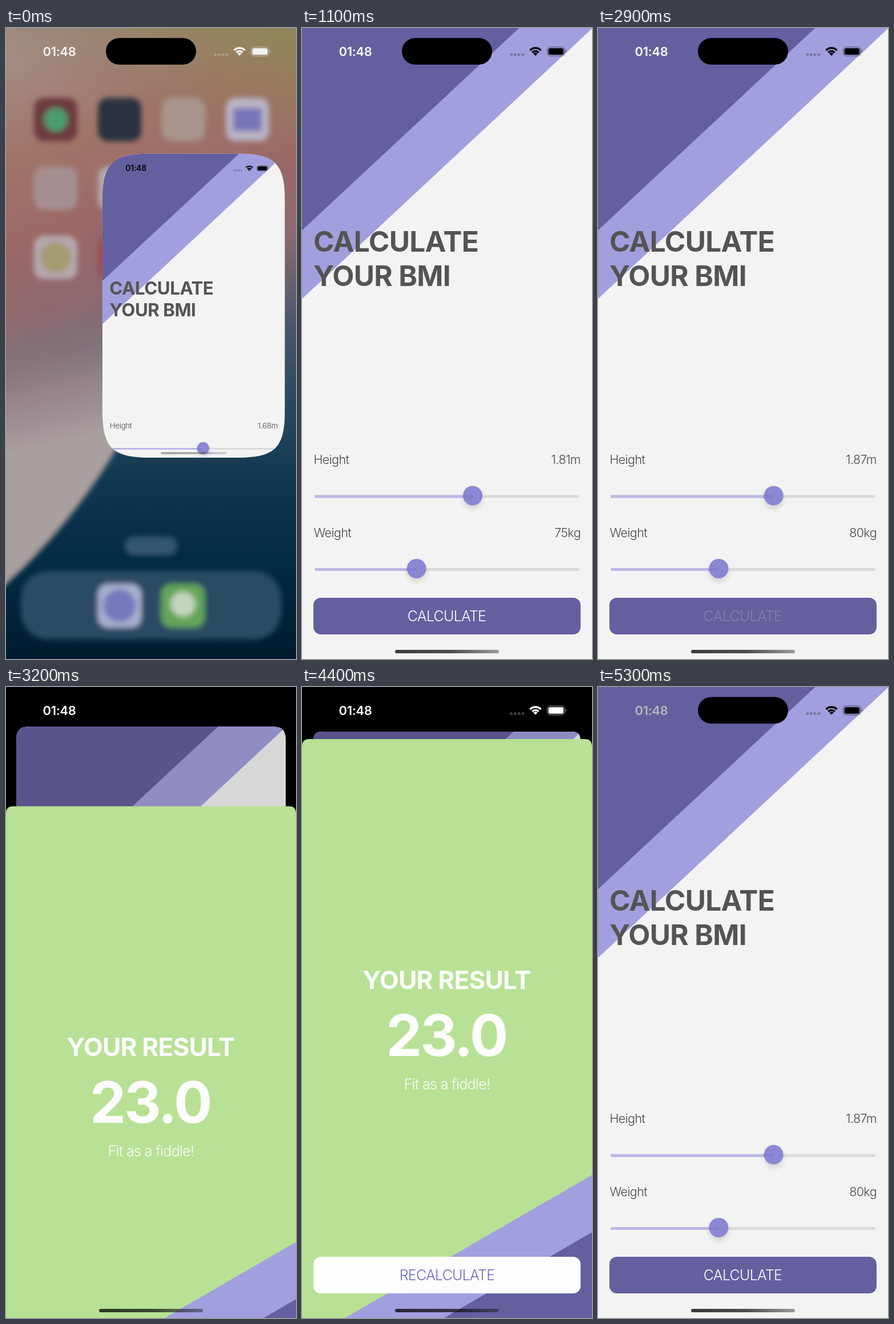
An HTML page for the animation above (5.4 s loop, 508 px wide and 1103 px high).

```html
<!DOCTYPE html>
<html lang="en">
<head>
<meta charset="utf-8">
<title>BMI calculator</title>
<style>
  html, body { margin: 0; width: 100%; height: 100%; overflow: hidden; background: #000; }
  svg { display: block; width: 100vw; height: 100vh; }
  text { font-family: Inter, "Liberation Sans", sans-serif; }
  .title { font-weight: 700; font-size: 49.5px; letter-spacing: -.014em; fill: #545454; }
  .label { font-weight: 300; font-size: 21.5px; letter-spacing: -.028em; fill: #484848; }
  .btn { font-weight: 300; font-size: 25px; letter-spacing: -.03em; text-anchor: middle; }
  .head { font-weight: 700; font-size: 44px; letter-spacing: -.017em; text-anchor: middle; }
  .score { font-weight: 700; font-size: 100.5px; letter-spacing: -.033em; text-anchor: middle; }
  .note { font-weight: 300; font-size: 25px; letter-spacing: -.026em; text-anchor: middle; }
  .clock { font-weight: 600; font-size: 22px; letter-spacing: -.015em; }
  .end { text-anchor: end; }
</style>
</head>
<body>
<svg id="stage" viewBox="0 0 508 1103" preserveAspectRatio="none"></svg>
<script>
const W = 508, H = 1103, LOOP = 5400, STEP = 100;
const DARK = '#645f9e', LIGHT = '#a29fde';
const $ = id => document.getElementById(id);
const set = (id, attrs) => {
  for (const k in attrs) $(id).setAttribute(k, attrs[k]);
};
const clamp = v => Math.min(1, Math.max(0, v));

const rect = (x, y, w, h, r, fill, more = '') =>
  `<rect x="${x}" y="${y}" width="${w}" height="${h}" rx="${r}" fill="${fill}" ${more}/>`;
const text = (x, y, cls, str, more = '') =>
  `<text x="${x}" y="${y}" class="${cls}" ${more}>${str}</text>`;
const dot = (x, y, r, fill, more = '') =>
  `<circle cx="${x}" cy="${y}" r="${r}" fill="${fill}" ${more}/>`;
const tile = (x, y, fill) => rect(x - 38, y - 38, 76, 76, 18, fill);
const stops = list => list.map(([o, c, a = 1]) =>
  `<stop offset="${o}" stop-color="${c}" stop-opacity="${a}"/>`).join('');
const ramp = (id, x1, y1, x2, y2, list) =>
  `<linearGradient id="${id}" gradientUnits="userSpaceOnUse" x1="${x1}" y1="${y1}" x2="${x2}" y2="${y2}">${stops(list)}</linearGradient>`;

// Rounded rectangle with continuous-curvature corners
function squircle(w, h, r) {
  const e = 1.5 * r, c = .281 * r;
  return `M${e} 0H${w - e}C${w - c} 0 ${w} ${c} ${w} ${e}V${h - e}` +
    `C${w} ${h - c} ${w - c} ${h} ${w - e} ${h}H${e}` +
    `C${c} ${h} 0 ${h - c} 0 ${h - e}V${e}C0 ${c} ${c} 0 ${e} 0Z`;
}

function arc(r) {
  const d = r * Math.SQRT1_2;
  return `M${409 - d} ${48.4 - d}A${r} ${r} 0 0 1 ${409 + d} ${48.4 - d}`;
}

function statusBar(id) {
  const cells = [366.6, 373.4, 380.2, 387].map(x => dot(x, 46.4, 2.5, 'currentColor', 'opacity=".25"')).join('');
  return `<g id="${id}">
    <g id="${id}Time">${text(64.5, 49, 'clock', '01:48', 'fill="currentColor"')}</g>
    <g id="${id}Icons">${cells}
      <path d="${arc(13.4)}${arc(8)}" fill="none" stroke="currentColor" stroke-width="3.4"/>
      <path d="M409 48.4L405.2 44.6A5.4 5.4 0 0 1 412.8 44.6Z" fill="currentColor"/>
      ${rect(429.6, 33.2, 30.6, 15.6, 5, 'none', 'stroke="currentColor" stroke-width="1.3" stroke-opacity=".45"')}
      ${rect(431.6, 35.2, 26.6, 11.6, 3.2, 'currentColor')}
      <path d="M461.8 38.4Q465 41 461.8 43.6Z" fill="currentColor" opacity=".5"/>
    </g></g>`;
}

function slider(id, y, label) {
  return text(20.5, y - 57, 'label', label) +
    text(488, y - 57, 'label end', '', `id="${id}Text"`) +
    rect(22, y - 2.5, 464, 5, 2.5, '#dadadb') +
    rect(22, y - 2.5, 200, 5, 2.5, '#bcb9e5', `id="${id}Fill"`) +
    `<g id="${id}Knob">${dot(0, y + 4, 17, '#000', 'opacity=".13" filter="url(#soft)"')}
     ${dot(0, y - 1.5, 17, '#8b87d2')}${rect(-17, y - 2.5, 17, 5, 0, '#827ecf')}</g>`;
}

const home = `<g id="home">
  ${rect(0, 0, W, H, 0, 'url(#night)')}
  ${rect(0, 0, W, H, 0, 'url(#dusk)')}
  ${rect(0, 0, W, 330, 0, 'url(#olive)')}
  <path d="M-30 480H260L240 640C205 735 105 885 -20 990Z" fill="url(#dune)" filter="url(#blur)"/>
  <g filter="url(#blur)">
    ${tile(87, 160, '#6d3b40')}${dot(87, 160, 21, '#4b9a70')}
    ${tile(199, 160, '#2b3340')}
    ${tile(311, 160, '#a8948c')}
    ${tile(423, 160, '#b9b3c4')}${rect(398, 140, 50, 40, 4, '#7774b8')}
    ${tile(87, 280, '#a68f90')}${tile(199, 280, '#b5a9a9')}
    ${tile(87, 401, '#b5a9ad')}${dot(87, 401, 27, '#a39b72')}
    ${tile(199, 401, '#a04a50')}
    ${rect(208, 889, 92, 33, 16, '#35566c')}
    ${rect(26, 949, 456, 120, 48, '#2b4b62')}
    ${tile(199, 1010, '#a9b1cf')}${dot(199, 1010, 29, '#7779bd')}
    ${tile(310, 1010, '#63a559')}${dot(310, 1007, 22, '#c3d4bd')}
  </g>
  ${rect(0, 0, W, H, 0, '#000', 'id="shade"')}
</g>`;

const card = `<g id="card"><g clip-path="url(#cardClip)">
  ${rect(0, 0, W, H, 0, '#f3f3f3')}
  <path d="M0 0H509L0 473.5Z" fill="${LIGHT}"/>
  <path d="M0 0H380.5L0 353.5Z" fill="${DARK}"/>
  ${text(20, 391, 'title', 'CALCULATE')}${text(20, 451, 'title', 'YOUR BMI')}
  ${slider('height', 819, 'Height')}${slider('weight', 946.5, 'Weight')}
  ${rect(20, 996, 468, 64, 13, DARK)}
  ${text(253.5, 1037, 'btn', 'CALCULATE', 'id="go" fill="#fff"')}
  ${statusBar('inner')}
  ${rect(0, 0, W, H, 0, '#000', 'id="dim"')}
</g></g>`;

const sheet = `<g id="sheet"><g clip-path="url(#sheetClip)">
  ${rect(0, 91, W, 1012, 0, '#b8e195')}
  <path d="M508 853V1103H75Z" fill="${LIGHT}"/>
  <path d="M508 953V1103H249Z" fill="${DARK}"/>
  ${text(253.5, 528, 'head', 'YOUR RESULT', 'fill="#fdfdfd"')}
  ${text(252.5, 645, 'score', '23.0', 'fill="#fdfdfd"')}
  ${text(254, 703, 'note', 'Fit as a fiddle!', 'fill="#fdfdfd"')}
  ${rect(20, 996, 468, 64, 13, '#fdfdfe')}
  ${text(254, 1037, 'btn', 'RECALCULATE', 'fill="#6e69c4"')}
</g></g>`;

$('stage').innerHTML = `<defs>
  <filter id="blur" x="-20%" y="-20%" width="140%" height="140%"><feGaussianBlur stdDeviation="5"/></filter>
  <filter id="soft" x="-60%" y="-60%" width="220%" height="220%"><feGaussianBlur stdDeviation="5"/></filter>
  ${ramp('night', 0, 300, 0, H, [[0, '#5a7079'], [.3, '#3b5a70'], [.6, '#123850'], [.8, '#022a42'], [1, '#021b2e']])}
  ${ramp('dusk', 110, 0, 350, 720, [[0, '#a38f88'], [.25, '#a07468'], [.45, '#9b6768'], [.62, '#8a6a70'], [.78, '#59596b', .8], [1, '#1c3c55', 0]])}
  ${ramp('olive', 420, 0, 340, 200, [[0, '#8f8656', .85], [.35, '#93805c', .6], [1, '#93705c', 0]])}
  ${ramp('dune', 60, 500, 110, 720, [[0, '#a38587', 0], [.6, '#a79092', .8], [1, '#aa9f9f']])}
  ${ramp('grip', 163, 0, 345, 0, [[0, '#000', .76], [.55, '#000', .68], [1, '#000', .36]])}
  <clipPath id="cardClip"><path id="cardShape"/></clipPath>
  <clipPath id="sheetClip"><path d="M0 1103V104Q0 91 13 91H495Q508 91 508 104V1103Z"/></clipPath>
  </defs>
  ${rect(0, 0, W, H, 0, '#000')}
  ${home}${card}${sheet}
  ${statusBar('outer')}
  ${rect(175, 17.5, 158, 46.5, 23.2, '#000')}
  ${rect(163, 1087, 182, 6, 3, 'url(#grip)', 'id="bar"')}`;

// Critically damped spring: 1 at the start, settling to 0
const spring = ms => {
  const x = Math.max(0, ms) * .01235;
  return (1 + x) * Math.exp(-x);
};

function sheetPos(t) {
  if (t >= 5300 || t < 2900) return 0;
  if (t > 4700) return spring(t - 4700);
  return t >= 3600 ? 1 : 1 - spring(t - 2900);
}

function setSlider(id, part, label) {
  const x = 39 + 431 * part;
  set(id + 'Fill', { width: x - 22 });
  set(id + 'Knob', { transform: `translate(${x} 0)` });
  $(id + 'Text').textContent = label;
}

function drawStatus(t, opening) {
  const white = t >= 4800 ? 0 : clamp((t - 3400) / 200);
  const level = Math.round(255 * white);
  const icons = opening ? '#f2f2f2' : `rgb(${level},${level},${level})`;
  set('outerIcons', { color: icons });
  set('outerTime', { color: t >= 5300 ? '#b8b6ba' : opening ? '#f2f2f2' : '#fff' });
  set('outer', { opacity: opening ? clamp(1 - t / 222) : 1 });
  set('inner', { opacity: opening ? 1 : 0 });
  set('innerTime', { color: t < 100 ? '#000' : '#fff' });
  set('innerIcons', { color: '#000' });
}

function draw(t) {
  const opening = t < 600;
  const p = sheetPos(t);
  const q = opening ? Math.exp(-.01177 * t) : 0;
  const drop = opening ? Math.exp(-.01086 * t) : 0;

  // Card: grows out of the home screen, later recedes behind the sheet
  const scale = 1 - .37 * q - .0787 * p;
  const x = opening ? 168.7 * q : 20 * p;
  const y = opening ? 219.5 * drop : 78 * p;
  const h = H - 259 * q;
  const r = opening ? 76 + 16 * q : p ? 71 - 57 * p : 0;
  const place = `translate(${x} ${y}) scale(${scale})`;
  set('card', { transform: place });
  set('cardShape', { d: squircle(W, h, r) });
  set('dim', { opacity: .127 * p });
  set('home', { visibility: opening ? 'visible' : 'hidden' });
  set('shade', { opacity: .3 * (1 - q) });
  set('bar', {
    transform: opening ? `${place} translate(0 ${h - H})` : '',
    opacity: t < 100 ? .42 : 1
  });

  set('sheet', {
    transform: `translate(0 ${1012 * (1 - p)})`,
    visibility: p ? 'visible' : 'hidden'
  });

  const tall = 1.68 + .19 * (1 - Math.pow(1 - clamp((t - 900) / 400), 1.66));
  const mass = 75 + 5 * clamp((t - 1300) / 200);
  setSlider('height', tall / 3, tall.toFixed(2) + 'm');
  setSlider('weight', mass / 200, Math.round(mass) + 'kg');
  set('go', { opacity: t >= 2900 && t < 3200 ? .2 : 1 });

  drawStatus(t, opening);
}

const start = performance.now();
function tick() {
  const t = (performance.now() - start) % LOOP;
  draw(Math.floor(t / STEP) * STEP);
  requestAnimationFrame(tick);
}
tick();
</script>
</body>
</html>
```
